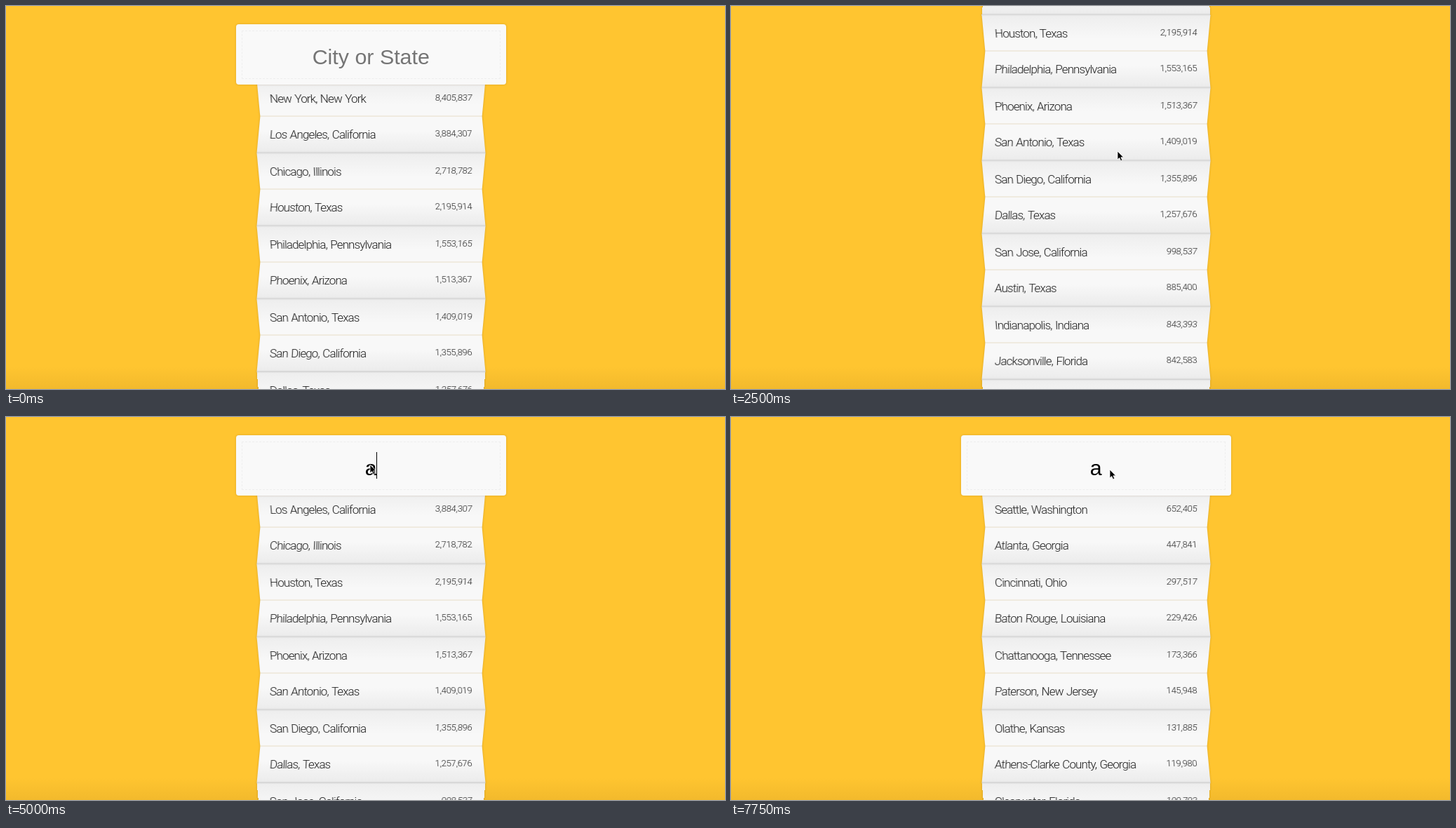
Write an HTML page that moves like this. It is 1025 by 546 pixels and loops after 8000 ms.

```html
<!DOCTYPE html>
<html lang="en">
<head>
<meta charset="utf-8">
<title>City search</title>
<style>
html, body { margin: 0; width: 100%; height: 100%; overflow: hidden; }
body {
  position: relative;
  background: linear-gradient(transparent calc(100% - 32px), rgba(90, 50, 0, .08)) #ffc530;
}
#page, #list, #cursor { position: absolute; left: 0; top: 0; }
#list { filter: drop-shadow(0 0 1.5px rgba(90, 55, 0, .25)); width: 1025px; height: 1400px; }
.row {
  position: absolute; left: 359.8px; width: 321px; height: 52.2px;
  font: 300 17px/53.4px Roboto, "Liberation Sans", sans-serif;
  letter-spacing: -.053em; word-spacing: 1.2px; color: #1c1c1c; white-space: nowrap;
}
/* Each shadow line lies under the next row, so the folds stay closed */
.down {
  transform: perspective(148.6px) rotateX(-5deg);
  background: linear-gradient(#e2e2e2, #eee 2px, #f8f8f8 65%, #f8f8f8 51.4px, #e6dcc4 51.4px);
  box-shadow: 0 1px #e6dcc4;
}
.up {
  transform: perspective(148.6px) rotateX(5deg);
  background: linear-gradient(#f8f8f8 40%, #ececec 50px, #d4d4d4);
  box-shadow: 0 1px #d0d0d0;
}
.row span { position: absolute; left: 16px; }
.row b {
  position: absolute; right: 16.6px; color: #222;
  font-weight: 300; font-size: 13px; line-height: 50.6px; letter-spacing: -.3px;
}
#head {
  position: absolute; left: 328px; top: 26px; width: 384.5px; height: 86px;
  border-radius: 4px; background: #f9f9f9; box-shadow: 0 0 3px rgba(90, 55, 0, .25);
}
#head::before {
  content: ""; position: absolute; left: 8px; top: 9px; right: 8px; bottom: 8px;
  box-sizing: border-box; border: 1px dashed #eee;
}
#field {
  position: absolute; left: 0; right: 0; top: 26.5px; text-align: center;
  font: 30.4px/38px "Liberation Sans", Arial, sans-serif; color: #000;
}
#field span { position: relative; }
#field.empty { color: #757575; }
#caret { position: absolute; top: 24px; width: 1px; height: 38px; background: #000; }
</style>
</head>
<body>
<div id="page">
  <div id="list"></div>
  <div id="head"><div id="field"><span id="text"></span></div><div id="caret"></div></div>
</div>
<svg id="cursor" width="14" height="18" overflow="visible">
  <path d="M0 0V12L2.7 9.5 4.7 13.7 6.8 12.8 4.9 8.8H8.6Z" stroke="#fff" stroke-width=".8"/>
</svg>
<script>
const LOOP = 8000, STEP = 250;
const cities = `New York, New York|8,405,837
Los Angeles, California|3,884,307
Chicago, Illinois|2,718,782
Houston, Texas|2,195,914
Philadelphia, Pennsylvania|1,553,165
Phoenix, Arizona|1,513,367
San Antonio, Texas|1,409,019
San Diego, California|1,355,896
Dallas, Texas|1,257,676
San Jose, California|998,537
Austin, Texas|885,400
Indianapolis, Indiana|843,393
Jacksonville, Florida|842,583
San Francisco, California|837,442
Columbus, Ohio|822,553
Charlotte, North Carolina|792,862
Fort Worth, Texas|792,727
Seattle, Washington|652,405
Atlanta, Georgia|447,841
Cincinnati, Ohio|297,517
Baton Rouge, Louisiana|229,426
Chattanooga, Tennessee|173,366
Paterson, New Jersey|145,948
Olathe, Kansas|131,885
Athens-Clarke County, Georgia|119,980
Clearwater, Florida|109,703
Atlantic City, New Jersey|39,551`.split("\n").map(line => line.split("|"));

// Time, typed text, list filter, caret shown
const states = [
  [0, "", "", 0], [500, "", "", 1], [750, "a", "", 1], [1000, "a", "a", 1],
  [5500, "at", "a", 1], [5750, "atl", "at", 1], [6000, "atl", "atl", 1],
  [6500, "atl", "atl", 0], [7000, "atl", "atl", 1], [7500, "atl", "atl", 0],
  [7750, "a", "at", 0]
];
const scroll = [
  [1500, 0], [1750, 40], [2000, 94], [2500, 197], [2750, 237], [3000, 262],
  [3250, 255], [3500, 218], [3750, 160], [4000, 2], [4250, 0]
];
const pointer = [
  [1000, 519, 68], [1250, 532, 125], [1500, 551, 207], [4250, 551, 207],
  [4500, 544, 168], [4750, 526, 96], [5000, 519, 68], [6500, 519, 68], [7500, 540, 75]
];

const $ = id => document.getElementById(id);
const page = $("page"), list = $("list"), field = $("field"),
      text = $("text"), caret = $("caret"), cursor = $("cursor");
let shownFilter = null;

function at(keys, t, i = 1) {
  const next = keys.findIndex(key => key[0] > t);
  if (next < 0) return keys[keys.length - 1][i];
  if (next === 0) return keys[0][i];
  const a = keys[next - 1], b = keys[next];
  return a[i] + (b[i] - a[i]) * (t - a[0]) / (b[0] - a[0]);
}

function fillList(filter) {
  if (filter === shownFilter) return;
  shownFilter = filter;
  list.innerHTML = cities
    .filter(([name]) => name.toLowerCase().includes(filter))
    .map(([name, count], i) => {
      const seam = 157.2 + 104 * (i >> 1);
      const top = seam + (i % 2 ? 25.6 : -25.6) - 26.1;
      return `<div class="row ${i % 2 ? "up" : "down"}" style="top:${top}px">` +
        `<span>${name}</span><b>${count}</b></div>`;
    }).join("");
}

function draw(now) {
  const t = Math.floor(now % LOOP / STEP) * STEP;
  const [, typed, filter, caretOn] = states.filter(s => s[0] <= t).pop();
  fillList(filter);
  field.className = typed ? "" : "empty";
  text.textContent = typed || "City or State";
  caret.style.left = (typed ? text.offsetLeft + text.offsetWidth - 1 : 192) + "px";
  caret.hidden = !caretOn;
  page.style.transform = `translateY(${-at(scroll, t)}px)`;
  cursor.style.visibility = t < 500 ? "hidden" : "visible";
  cursor.style.transform = `translate(${at(pointer, t)}px, ${at(pointer, t, 2)}px)`;
  requestAnimationFrame(draw);
}
draw(0);
</script>
</body>
</html>
```
